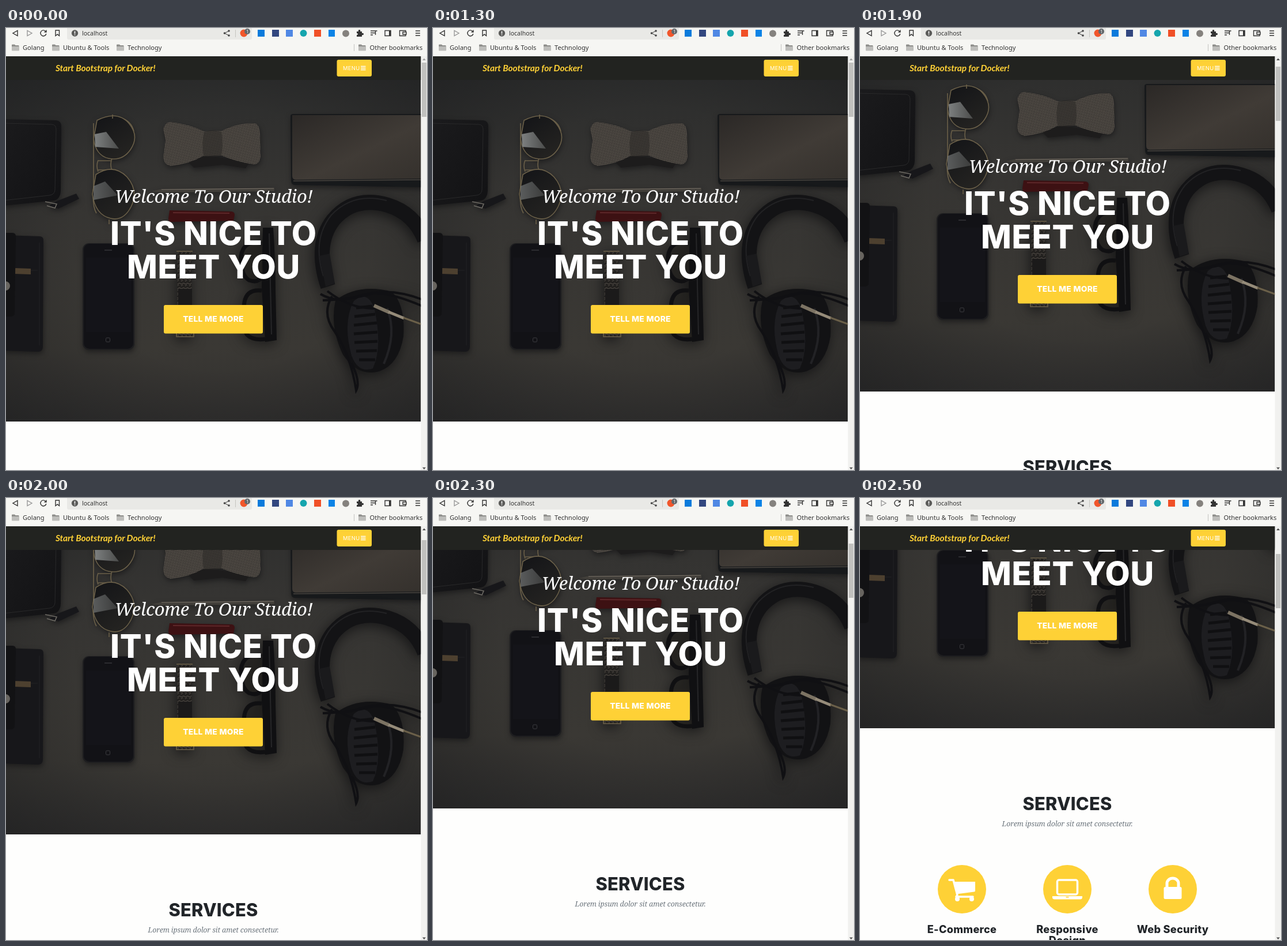
Recreate the animation shown at these times as an HTML page. Size 731 by 766 pixels, loop 8500 ms.

```html
<!DOCTYPE html>
<html lang="en">
<head>
<meta charset="utf-8">
<title>Studio page scroll</title>
<style>
  html, body { margin: 0; height: 100%; overflow: hidden; background: #fefefd; }
  svg { display: block; width: 100%; height: 100%; }
  text { font-family: Inter, "Open Sans", sans-serif; }
  .ui { font: 11.1px "Noto Sans", "Open Sans", sans-serif; fill: #333; }
  .brand { font: italic 700 15.5px Lato, sans-serif; letter-spacing: -.1px; fill: #fed136; }
  .serif { font-family: "Noto Serif", "Liberation Serif", serif; font-style: italic; }
  .mid { text-anchor: middle; }
  .bold { font-weight: 800; }
  .white { fill: #fff; }
  .yellow { fill: #fed136; }
  .line { fill: none; stroke: #333; stroke-width: 1.4; }
  .cable { fill: none; stroke: #101013; stroke-width: 4; }
  .gold { fill: none; stroke: #6b6049; stroke-width: 1.6; }
  .lens { fill: url(#lens); stroke: #6b6049; stroke-width: 1.6; }
  .card { font-size: 18.2px; letter-spacing: .25px; fill: #212529; }
</style>
</head>
<body>
<svg viewBox="0 0 731 766" preserveAspectRatio="none">
  <defs>
    <linearGradient id="table" x2="0" y2="1">
      <stop offset="0" stop-color="#2a2b2b"/>
      <stop offset=".35" stop-color="#353432"/>
      <stop offset=".8" stop-color="#3a3834"/>
      <stop offset="1" stop-color="#302f2e"/>
    </linearGradient>
    <radialGradient id="vignette" cx=".52" cy=".5" r=".72">
      <stop offset=".5" stop-color="#161719" stop-opacity="0"/>
      <stop offset="1" stop-color="#161719" stop-opacity=".45"/>
    </radialGradient>
    <linearGradient id="leather" x2="1" y2="1">
      <stop offset="0" stop-color="#2b2826"/>
      <stop offset=".55" stop-color="#403b36"/>
      <stop offset="1" stop-color="#34302c"/>
    </linearGradient>
    <linearGradient id="dark" x2="1" y2="1">
      <stop offset="0" stop-color="#1b1b1d"/>
      <stop offset="1" stop-color="#121214"/>
    </linearGradient>
    <linearGradient id="lens" x2=".6" y2="1">
      <stop offset="0" stop-color="#131417"/>
      <stop offset="1" stop-color="#242321"/>
    </linearGradient>
    <linearGradient id="glare">
      <stop offset="0" stop-color="#7d8080"/>
      <stop offset="1" stop-color="#4a4b4a"/>
    </linearGradient>
    <pattern id="tweed" width="4" height="4" patternUnits="userSpaceOnUse" patternTransform="rotate(35)">
      <path d="M0 0h4v4h-4z" fill="#35322f"/>
      <path d="M0 0h2v2h-2zM2 2h2v2h-2z" fill="#58524b"/>
    </pattern>
    <pattern id="strap" width="7" height="8" patternUnits="userSpaceOnUse">
      <path d="M0 0h7v8h-7z" fill="#23211f"/>
      <path d="M0 2l4 2 3-2M3 7l3-2" fill="none" stroke="#55504a"/>
    </pattern>
    <filter id="shade" x="-5%" y="-5%" width="110%" height="110%" color-interpolation-filters="sRGB">
      <feDropShadow dx="1" dy="4" stdDeviation="5" flood-color="#101012" flood-opacity=".6"/>
    </filter>
    <filter id="deepShade" x="-15%" y="-15%" width="130%" height="130%" color-interpolation-filters="sRGB">
      <feDropShadow dx="-2" dy="5" stdDeviation="11" flood-color="#101012" flood-opacity=".85"/>
    </filter>
    <filter id="lift" x="-20%" y="-20%" width="140%" height="140%" color-interpolation-filters="sRGB">
      <feDropShadow dx="0" dy="1" stdDeviation="2" flood-opacity=".45"/>
    </filter>
    <clipPath id="hero"><path d="M0 49h720.500v633h-720.500z"/></clipPath>
    <g id="folder">
      <path d="M0 1q0-1 1-1h4l1.500 1.500h5q1 0 1 1v8h-12.500z" fill="#8f8f8c"/>
      <path d="M0 3.500h13v6.500q0 1-1 1h-11q-1 0-1-1z" fill="#bdbdba"/>
    </g>
  </defs>

  <path d="M0 0h731v766h-731z" fill="#fefefd"/>

  <g id="page">
    <g clip-path="url(#hero)">
      <path d="M0 49h720.500v633h-720.500z" fill="url(#table)"/>
      <path d="M0 49h720.500v633h-720.500z" fill="url(#vignette)"/>
      <g filter="url(#shade)">
        <!-- zip wallet -->
        <path d="M-5 158l92 2q9 1 9 10l-1 112q-1 15-12 17l-88 9z" fill="url(#dark)"/>
        <path d="M-5 165l84 2q8 0 8 9l-2 105q-1 8-10 9l-80 9" fill="none" stroke="#29292a"/>
        <path d="M88 300l34-13 5 9-36 17-16-5z" fill="#17171a"/>
        <path d="M68 301l20 4-3 7-14-4" class="gold" style="stroke:#6d6a64"/>
        <!-- aviators -->
        <path d="M152 165v108q-3 35 5 48M184 155h14q20 6 24 24M160 229q-4 10 0 20M184 226q-4 12 0 20M160 230h22M160 246h22" class="gold"/>
        <path d="M158 160q36-18 56 6 18 22 2 45-14 20-38 15-22-5-26-34z" class="lens"/>
        <path d="M156 254q30-20 54 4 21 24 7 52-13 25-35 20-27-6-32-42z" class="lens"/>
        <path d="M154 184l20-4 22 29-41-3z" fill="url(#glare)"/>
        <path d="M152 274l20-8 22 24-42 8z" fill="url(#glare)" fill-opacity=".65"/>
        <path d="M185 150v7M179 332v8" class="gold"/>
        <!-- bow tie -->
        <path d="M310 226l45-4 68 10-7 11-40-6-50 5z" fill="#1d1c1c"/>
        <path d="M286 163q30 3 58 16l31-1q25-13 57-13 8 2 9 18l1 40q-2 15-14 13-28-4-54-15l-32 1q-24 14-56 17-12-2-13-15l4-30-4-18q3-13 13-13z" fill="url(#tweed)"/>
        <path d="M344 180q16-5 30 0 4 20 0 41-15 5-31 0-4-20 1-41z" fill="#292725" fill-opacity=".5"/>
        <!-- case -->
        <path d="M494 153q0-4 5-4h230v127l-228-4q-6-1-6-8z" fill="#17191b"/>
        <path d="M497 151h230v110l-224 2q-6 0-6-7z" fill="url(#leather)"/>
        <path d="M499 265l225-2" stroke="#48443f" stroke-width="1.500"/>
        <!-- pen and knife -->
        <path d="M253 283l17-4 196-2v6l-196 2z" fill="#423f3a"/>
        <path d="M270 280l195-2" stroke="#777067"/>
        <path d="M284 316l108 2q5 1 5 6l-2 10-108 2q-5 0-5-6z" fill="#3d1113"/>
        <path d="M290 320l98 1" stroke="#5e2729" stroke-width="2"/>
        <!-- phone -->
        <rect x="133" y="373" width="90" height="185" rx="11" fill="#1e1e20"/>
        <rect x="135" y="374" width="86" height="182" rx="10" fill="#121216"/>
        <path d="M139 398h78v129h-78z" fill="#141419"/>
        <rect x="173.500" y="537" width="7" height="7" rx="1.500" fill="none" stroke="#3c3c40"/>
        <path d="M171 385h13" stroke="#2c2c30" stroke-width="2"/>
        <!-- card holder -->
        <path d="M-5 359l63 2q7 0 7 7l-1 184q0 9-9 9l-60-2z" fill="#17171a"/>
        <path d="M-5 420h60M58 372v178" stroke="#232325"/>
        <path d="M14 416l29 1v10l-29-1z" fill="#4d402f"/>
        <path d="M-5 355h16q6 0 6 6l-2 134q-1 5-7 5h-13z" fill="#121214"/>
        <circle cx="-1" cy="447" r="8" fill="#67645f"/>
      </g>
      <g filter="url(#deepShade)">
        <!-- watch -->
        <path d="M298 386h24l1 150h-26z" fill="url(#strap)"/>
        <path d="M299 452h24v60h-24z" fill="#1b1a1a"/>
        <path d="M296 387h28M296 524v11h30v-11" class="gold"/>
        <!-- glasses -->
        <path d="M446 346h18q4 60 4 110l2 85-20 3-6-95z" fill="#101012"/>
        <path d="M444 374q-32-8-36 22-1 32 14 41 17 6 24-8M444 455q-26-3-30 20-6 42 4 56 10 11 32 8" fill="#24231f" fill-opacity=".5" stroke="#101012" stroke-width="7"/>
        <path d="M457 356l4 175" stroke="#262628" stroke-width="2"/>
        <!-- headphones -->
        <path d="M559 448q-24-72 9-115 36-43 95-26 46 14 64 60" fill="none" stroke="#131315" stroke-width="26"/>
        <path d="M551 430q-20-64 14-106 38-40 96-25" fill="none" stroke="#222224" stroke-width="2"/>
        <path d="M544 395l18-4 9 52-16 5z" fill="#1a1a1c"/>
        <path d="M572 472q40-30 98-15 24 24 20 78-8 48-42 60-37 10-63-29-23-48-13-94z" fill="#121214"/>
        <path d="M604 473q25-20 36 15 14 65-3 102-25 9-37-22-16-58 4-95z" fill="#1d1d20"/>
        <path d="M608 485l28-3M605 500l36-4M604 515l40-4M604 530l41-3M605 545l40-2M608 560l36-1M613 575l28 0" stroke="#101012" stroke-width="5"/>
        <path d="M662 486q17 44-6 96" fill="none" stroke="#222225" stroke-width="4"/>
        <path d="M546 461q28 17 68 3 52-16 110 7M550 472q50-2 88-12 32-1 85 22M566 465q-18 30 4 60 29 43 38 103 8-15-8-47" class="cable"/>
        <path d="M558 456q45 35 93 29" class="cable"/>
        <path d="M639 481l27 12" stroke="#7c7363" stroke-width="6"/>
        <path d="M664 492l27 11" stroke="#958b79" stroke-width="5"/>
        <path d="M690 502l33 12" stroke="#6b6049" stroke-width="3"/>
      </g>
    </g>
    <text class="serif white mid" x="360.500" y="303" font-size="31" letter-spacing="-.25">Welcome To Our Studio!</text>
    <g class="white bold mid" font-size="56" letter-spacing=".8">
      <text x="360.500" y="376">IT'S NICE TO</text>
      <text x="360.500" y="433.500">MEET YOU</text>
    </g>
    <rect class="yellow" x="274" y="480" width="172" height="49.500" rx="3"/>
    <text class="white bold mid" x="360" y="509" font-size="13.800" letter-spacing=".3">TELL ME MORE</text>

    <text class="bold mid" x="360" y="824" font-size="30.800" letter-spacing=".2" fill="#212529">SERVICES</text>
    <text class="serif mid" x="360" y="852" font-size="12.400" letter-spacing="-.1" fill="#6c757d">Lorem ipsum dolor sit amet consectetur.</text>
    <g transform="translate(177 961)">
      <circle class="yellow" r="42"/>
      <path class="white" d="M-14-13h37v16q0 1-2 1.500l-31 4z"/>
      <path d="M-22-16h7l7 26-2 3h29" fill="none" stroke="#fff" stroke-width="3.500" stroke-linecap="round" stroke-linejoin="round"/>
      <circle class="white" cx="-8" cy="17" r="4"/>
      <circle class="white" cx="17" cy="17" r="4"/>
    </g>
    <g transform="translate(360 961)">
      <circle class="yellow" r="42"/>
      <rect x="-17.500" y="-16" width="35" height="25" rx="3" fill="none" stroke="#fff" stroke-width="3.500"/>
      <path class="white" d="M-26 12h52v2q0 3.500-4 3.500h-44q-4 0-4-3.500z"/>
      <path class="yellow" d="M-2.500 13h5v1.500h-5z"/>
    </g>
    <g transform="translate(543 961)">
      <circle class="yellow" r="42"/>
      <rect class="white" x="-15.500" y="-4" width="31" height="21" rx="2.500"/>
      <path d="M-10-3v-7a10 9 0 0 1 20 0v7" fill="none" stroke="#fff" stroke-width="5"/>
    </g>
    <g class="mid bold">
      <text class="card" x="177" y="1037">E-Commerce</text>
      <text class="card" x="360" y="1037">Responsive</text>
      <text class="card" x="360" y="1056">Design</text>
      <text class="card" x="543" y="1037">Web Security</text>
    </g>
  </g>

  <path d="M0 49h720.500v41h-720.500z" fill="#222320"/>
  <text class="brand" x="86" y="75">Start Bootstrap for Docker!</text>
  <rect class="yellow" x="574.500" y="55" width="60.500" height="29" rx="3"/>
  <text class="white" x="585" y="73" font-size="9.300" letter-spacing=".4">MENU</text>
  <path d="M616 66.500h8.500M616 69.500h8.500M616 72.500h8.500" stroke="#fff" stroke-width="1.600"/>

  <path d="M720.500 49h11v717h-11z" fill="#f1f1ef"/>
  <path id="up" d="M723 56l3-3.500 3 3.500z"/>
  <path d="M723 761.500l3 3.500 3-3.500z" fill="#505050"/>
  <path id="thumb" d="M722 60h8v94h-8z" fill="#c0c0be"/>

  <path d="M0 0h731v49h-731z" fill="#f6f6f3"/>
  <path d="M106 0h321v17q0 3-3 3h-315q-3 0-3-3z" fill="#e9e9e6"/>
  <g class="line">
    <path d="M20 4.500v9l-8-4.500z"/>
    <path d="M37 4.500v9l8-4.500z" stroke="#999"/>
    <path d="M69 6a5 5 0 1 0 .8 4M70 3.500v3.500h-3.500"/>
    <path d="M86 4h6.500v9.500l-3.200-2.500-3.300 2.500z"/>
    <path d="M387 5l-7.500 4 7.500 4" stroke-width="1"/>
    <path d="M633 5h8M633 8.500h8M633 12h4M641.500 12v-7h3"/>
    <path d="M658 4.500h10v9h-10z"/>
    <path d="M694 7v-2.500h-10.500v9h10.500v-2.500M689 7h6v4h-6z"/>
    <path d="M711 5h8M711 9h8M711 13h8"/>
    <path d="M398.500 3v13M604.500 28v12" stroke="#c4c4c0" stroke-width="1"/>
  </g>
  <path d="M609 6h3q-1-3 1.500-3t1.500 3h3v3q3-1 3 1.500t-3 1.500v3h-9v-3q2 0 2-1.500t-2-1.500z" fill="#333"/>
  <path d="M665 5h3v8h-3z" fill="#333"/>
  <g fill="#444">
    <circle cx="387" cy="5" r="1.800"/><circle cx="379.500" cy="9" r="1.800"/><circle cx="387" cy="13" r="1.800"/>
    <circle cx="119.500" cy="9" r="5.700" fill="#5b5b59"/>
  </g>
  <path d="M119.500 5.500v4.500M119.500 11v1.600" stroke="#fff" stroke-width="1.500"/>
  <text class="ui" x="132" y="13" style="font-size:10.500px">localhost</text>

  <circle cx="413" cy="9" r="6.500" fill="#f1562b"/>
  <circle cx="419" cy="6" r="5" fill="#63676b"/>
  <text class="white mid" x="419" y="8.500" font-size="7">1</text>
  <path d="M437 3h12v12h-12z" fill="#0b7bdc"/>
  <path d="M462 3h12v12h-12z" fill="#32477f"/>
  <path d="M486 3h12v12h-12z" fill="#5088e4"/>
  <circle cx="516.500" cy="9" r="6" fill="#15a5ad"/>
  <path d="M535 3h12v12h-12z" fill="#f05027"/>
  <path d="M560 3h11v12h-11z" fill="#0c83e6"/>
  <circle cx="590" cy="9.500" r="6" fill="#85827e"/>

  <use href="#folder" x="10" y="28.500"/>
  <use href="#folder" x="80" y="28.500"/>
  <use href="#folder" x="192" y="28.500"/>
  <use href="#folder" x="612" y="28.500"/>
  <text class="ui" x="29" y="38">Golang</text>
  <text class="ui" x="99" y="38">Ubuntu &amp; Tools</text>
  <text class="ui" x="211" y="38">Technology</text>
  <text class="ui" x="631.500" y="38">Other bookmarks</text>

  <g id="popup" opacity="0">
    <rect x="-60" y="285.500" width="180" height="142.500" rx="10" fill="#fefefd" filter="url(#lift)"/>
    <path d="M13 298h89v97h-89z" fill="#e4e6e9"/>
    <path d="M13 304h89v91h-89z" fill="#2b304b"/>
    <path d="M13 304h5v91h-5z" fill="#222640"/>
    <path d="M38 346h64v18h-64z" fill="#f2f3f4"/>
    <path d="M40 367h61v22h-61z" fill="#1c2736"/>
    <path d="M21 312h12M21 318h9M21 324h13M21 330h10M21 336h12M42 311h25M42 316h34M46 321h22M46 326h30M42 331h19M42 336h28" stroke="#6f7798" stroke-dasharray="5 2"/>
    <path d="M43 371h54M43 375h50M43 379h55M43 383h48" stroke="#4e7d9b" stroke-dasharray="4 2"/>
    <path d="M73 362h32v32h-32z" fill="#168bd8"/>
    <text class="ui" x="98" y="419" text-anchor="end" style="fill:#222">Bootstrap Theme - Perky</text>
  </g>
</svg>
<script>
  const LOOP = 8500;
  // [start in ms, value]; each value holds until the next start
  const scrollSteps = [[0, 0], [1800, 5], [1900, 52], [2000, 99], [2100, 116],
                       [2300, 144], [2400, 218], [2500, 283]];
  const popupSteps = [[0, 0], [100, .35], [200, .75], [300, 1], [1300, 0]];

  const byId = id => document.getElementById(id);
  const valueAt = (steps, t) => steps.findLast(([start]) => t >= start)[1];
  const page = byId('page'), thumb = byId('thumb'), up = byId('up'), popup = byId('popup');

  function draw() {
    const t = performance.now() % LOOP;
    const scroll = valueAt(scrollSteps, t);
    page.setAttribute('transform', `translate(0 ${-scroll})`);
    thumb.setAttribute('transform', `translate(0 ${Math.round(scroll * .131)})`);
    up.setAttribute('fill', scroll ? '#505050' : '#a3a3a3');
    popup.setAttribute('opacity', valueAt(popupSteps, t));
    requestAnimationFrame(draw);
  }
  draw();
</script>
</body>
</html>
```
